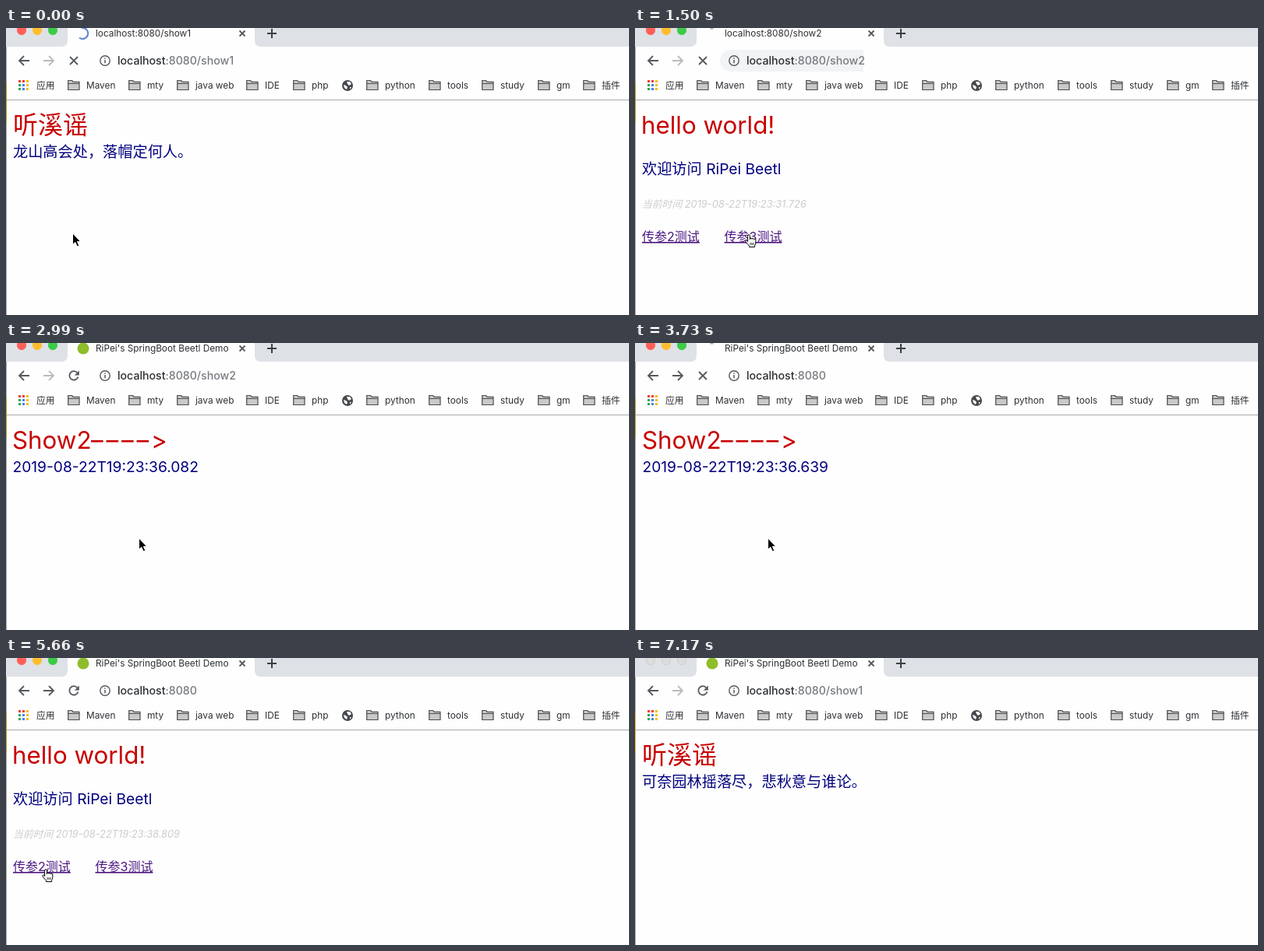
Write an HTML page that moves like this. It is 799 px wide and 369 px high and loops after 7.27 s.

```html
<!DOCTYPE html>
<html lang="zh">
<head>
<meta charset="utf-8">
<title>Browser demo</title>
<style>
html, body { margin: 0; width: 100%; height: 100%; overflow: hidden; background: #fefefe; }
svg { display: block; width: 799px; height: 369px; }
text { font-family: Inter, "Noto Sans CJK SC", "Noto Sans CJK", sans-serif; white-space: pre; }
.ui { font-size: 11.8px; fill: #2c2f33; }
.url { font-size: 14.15px; font-weight: 450; fill: #2b2e32; }
.dim { fill: #777b80; }
.head { font-size: 32px; fill: #c80000; }
.latin { font-size: 31.3px; }
.body { font-size: 19.2px; fill: #00007f; }
.time { font-size: 12.8px; font-weight: 450; fill: #ccc; font-style: italic; }
.link { font-size: 16px; fill: #4b1680; text-decoration: underline; }
.line { fill: none; stroke: #55595e; stroke-width: 1.8; }
</style>
</head>
<body>
<svg viewBox="0 0 799 369">
  <rect width="799" height="24" fill="#dee1e6"/>
  <path d="M71 24q8 0 8-8V0H319V16q0 8 8 8Z" fill="#fefefe"/>
  <g id="lights"></g>
  <path d="M299.500 3.500l7 7m0-7l-7 7" class="line"/>
  <path d="M335 7h12M341 1v12" class="line" style="stroke:#3c4043;stroke-width:2"/>
  <circle id="icon" cx="99" cy="7" r="7.500" fill="#8fbc2b"/>
  <path id="arc" d="M97 0A7 7 0 1 1 94 12.500" fill="none" stroke="#5b83d0" stroke-width="2"/>
  <rect id="dot" x="96.500" width="4" height="1.500" fill="#a5a8ac"/>
  <text id="title" class="ui" x="115" y="11"></text>

  <path id="pill" d="M293 28H123a14 14 0 0 0 0 28H293Z" fill="#f1f3f4"/>
  <path class="line" d="M30 42H17m6-6l-6 6 6 6"/>
  <path id="fwd" class="line" d="M48 42H61m-6-6l6 6-6 6"/>
  <path id="stop" class="line" d="M82 37l10 10m0-10l-10 10"/>
  <g id="reload"><path class="line" d="M91.500 38.200A5.700 5.700 0 1 0 92.500 43.500"/><path d="M93.800 35.500v6h-6z" fill="#55595e"/></g>
  <circle cx="127" cy="42" r="6.200" class="line" style="stroke-width:1.400"/>
  <path d="M127 41v4.300M127 38.300v1.500" class="line" style="stroke-width:1.500"/>
  <text class="url" x="143" y="47">localhost<tspan id="path" class="dim"></tspan></text>

  <g id="marks"></g>
  <path d="M0 92.500H799" stroke="#aaa"/>
  <path d="M.5 24V369" stroke="#a8a8a8"/>
  <path id="edge" d="M.5 71V122"/>
  <g id="page"></g>
  <g id="cursor"></g>
</svg>
<script>
const $ = id => document.getElementById(id);
const LOOP = 7270, DEMO = "RiPei's SpringBoot Beetl Demo";
const text = (cls, x, y, s) => `<text class="${cls}" x="${x}" y="${y}">${s}</text>`;

const poem = line => text('head', 9, 136, '听溪谣') + text('body', 9, 166, line);
const show = time => text('head latin', 8, 136,
  'Show2<tspan x="109 128.500 148 167.500">––––</tspan><tspan x="186">&gt;</tspan>') +
  text('body', 8.5, 166, '2019-08-22T19:23:' + time);
const hello = time => text('head latin', 8, 135.5, 'hello world!') +
  text('body', 9, 188, '欢迎访问 RiPei Beetl') +
  text('time', 9, 231, '当前时间 2019-08-22T19:23:' + time) +
  text('link', 9, 274, '传参2测试') + text('link', 114.5, 274, '传参3测试');

const shapes = {
  arrow: '<path d="M0 0V14.500L3.300 11.500 5.800 17 8.300 16 5.900 10.700H10.300Z" fill="#000" stroke="#fff" stroke-width="1"/>',
  hand: '<path d="M3.600 2.200a1.400 1.400 0 0 1 2.800 0V7l.2-1a1.200 1.200 0 0 1 2.400.5 1.200 1.200 0 0 1 2.400.5 1.200 1.200 0 0 1 2.400.8V11q0 2-1.200 3.600V16.600H5.500V15.200Q3.500 13 1 9.800.3 8.500 1.500 8T3.600 9.600Z" fill="#fff" stroke="#000"/>' +
    '<path d="M7 11v3M9 11v3M11 11v3" stroke="#000" stroke-width=".8"/>'
};
const at = (shape, x, y) => `<g transform="translate(${x} ${y})">${shapes[shape]}</g>`;
const arrow = (x, y) => at('arrow', x, y), hand = (x, y) => at('hand', x, y);

// Each step changes only the listed properties of the one before.
const steps = [
  [0, { page: poem('龙山高会处，落帽定何人。'), path: ':8080/show1', title: 'localhost:8080/show1',
        load: 'arc', fwd: false, pill: false, active: true, shift: 0, cursor: arrow(85.5, 264) }],
  [150, { title: DEMO, cursor: arrow(108, 263) }],
  [300, { load: '', cursor: arrow(131, 263) }],
  [600, { path: ':8080', load: 'dot', fwd: true }],
  [750, { page: hello('31.726'), load: '' }],
  [1200, { cursor: hand(141, 265) }],
  [1500, { path: ':8080/show2', title: 'localhost:8080/show2', load: 'dot', fwd: false, pill: true }],
  [1650, { page: show('34.899'), title: DEMO, load: '', pill: false }],
  [2100, { cursor: arrow(158, 259) }],
  [2250, { cursor: arrow(170.5, 251) }],
  [2700, { load: 'dot' }],
  [2850, { page: show('36.082'), load: 'arc' }],
  [2990, { load: '' }],
  [3290, { page: show('36.639'), load: 'arc' }],
  [3440, { load: '' }],
  [3730, { path: ':8080', load: 'dot', fwd: true, shift: 1 }],
  [3880, { page: hello('31.726'), load: '', shift: 0 }],
  [4030, { cursor: arrow(148, 264) }],
  [4170, { cursor: arrow(104, 279) }],
  [4320, { cursor: arrow(64, 282) }],
  [4470, { cursor: arrow(42, 280) }],
  [4620, { cursor: hand(36, 275) }],
  [5070, { cursor: hand(41, 273) }],
  [5220, { cursor: hand(46, 271) }],
  [5370, { load: 'dot' }],
  [5510, { page: hello('38.809'), load: 'arc' }],
  [5660, { load: '' }],
  [5950, { path: ':8080/show1', title: 'localhost:8080/show1', load: 'dot', fwd: false }],
  [6100, { page: poem('可奈园林摇落尽，悲秋意与谁论。'), title: DEMO, load: '' }],
  [6250, { cursor: arrow(190, 298) }],
  [6400, { cursor: arrow(430, 322) }],
  [6540, { cursor: arrow(679, 341) }],
  [6690, { cursor: '' }],
  [7170, { active: false }]
];
let last = {};
const states = steps.map(([time, change]) => [time, last = { ...last, ...change }]);

const folder = x => `<path d="M${x + .7} 67.500h5l1.500 1.800h7.800v10.200h-14.300zM${x + .7} 71.500h14.300" fill="#c9c9c9" stroke="#4c4c4c" stroke-width="1.200"/>`;
const marks = [[79, 'Maven'], [157, 'mty'], [219, 'java web'], [308, 'IDE'], [368, 'php'],
  [462, 'python'], [542, 'tools'], [610, 'study'], [682, 'gm'], [740, '插件']];
const hues = ['#ea4335', '#ea4335', '#fbbc05', '#34a853', '#4285f4', '#fbbc05', '#34a853', '#4285f4', '#fbbc05'];
$('marks').innerHTML =
  hues.map((c, i) => `<rect x="${16 + i % 3 * 5}" y="${67 + (i / 3 | 0) * 5}" width="3" height="3" fill="${c}"/>`).join('') +
  text('ui', 39, 78, '应用') +
  marks.map(([x, name]) => folder(x) + text('ui', x + 24, 78, name)).join('') +
  '<circle cx="438" cy="74" r="7" fill="#45494d"/>' +
  '<path d="M433 73l3 1 2 2-1 3-3-2zM437 69l4 0 2 3-3 2-2-2zM441 76l2 0-2 3z" fill="#fff"/>';

const lights = active => ['#ff5f57', '#ffbd2e', '#3bcb45'].map((c, i) =>
  `<circle cx="${20 + 20 * i}" cy="3" r="5.700" fill="${active ? c : '#dcdcdc'}" stroke="${active ? c : '#cbcbcb'}" stroke-width=".8"/>`).join('');
const see = (id, on) => $(id).style.display = on ? '' : 'none';

function draw(s) {
  $('title').textContent = s.title;
  $('path').textContent = s.path;
  $('page').innerHTML = s.page;
  $('page').setAttribute('transform', `translate(${s.shift} 0)`);
  $('cursor').innerHTML = s.cursor;
  $('lights').innerHTML = lights(s.active);
  $('edge').style.stroke = s.active ? '#b59b2c' : '#dcb83c';
  $('fwd').style.stroke = s.fwd ? '#55595e' : '#b9bbbe';
  see('icon', !s.load);
  see('arc', s.load === 'arc');
  see('dot', s.load === 'dot');
  see('stop', s.load);
  see('reload', !s.load);
  see('pill', s.pill);
}

let shown;
function tick() {
  const t = performance.now() % LOOP;
  const state = states.findLast(([time]) => time <= t)[1];
  if (state !== shown) draw(shown = state);
  requestAnimationFrame(tick);
}
tick();
</script>
</body>
</html>
```
